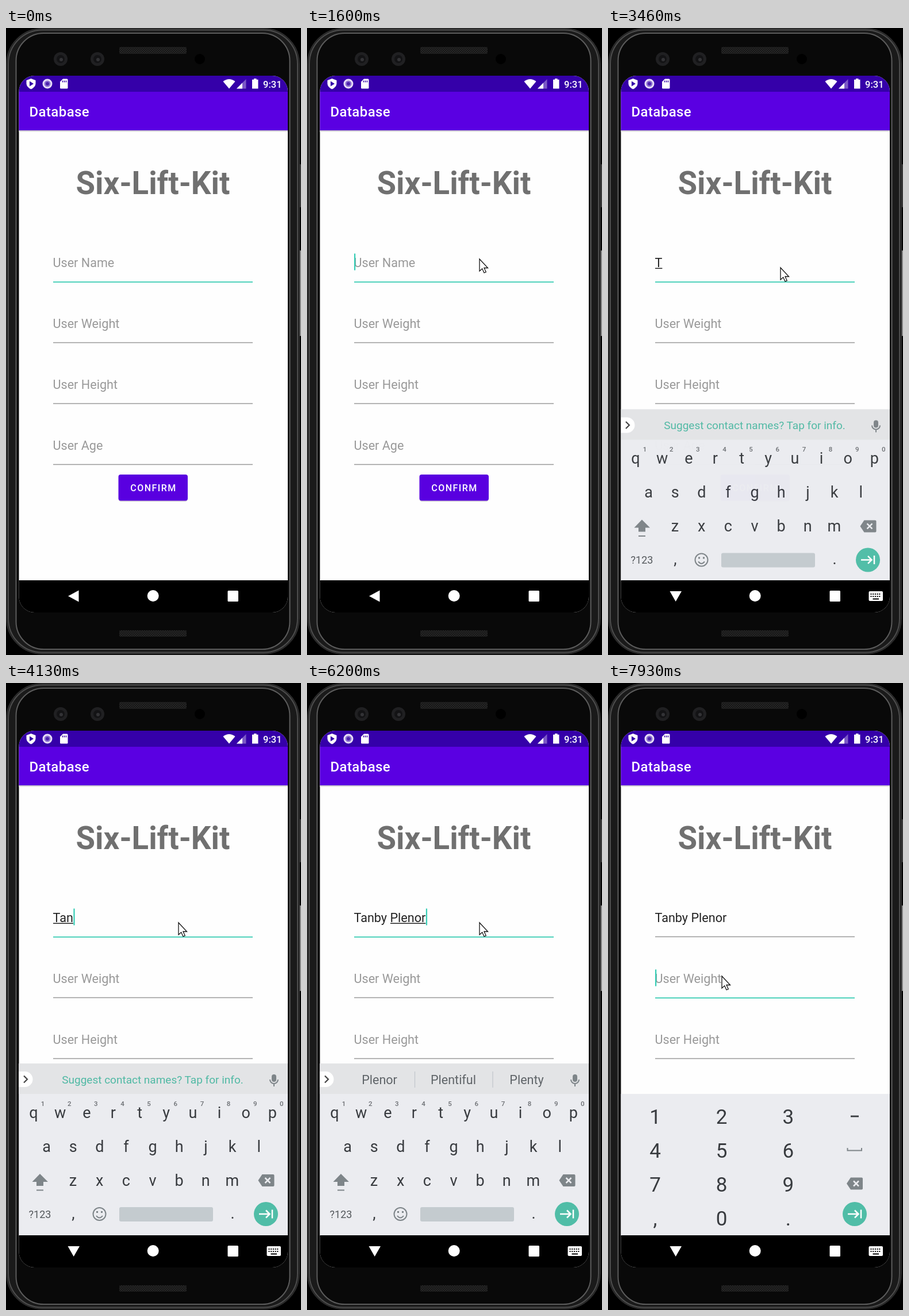
Animation of 513x1091 px, one loop 8 s. Source, as an HTML page:

```html
<!DOCTYPE html>
<html lang="en">
<head>
<meta charset="utf-8">
<title>Database</title>
<style>
  html, body { margin: 0; width: 100%; height: 100%; overflow: hidden; background: #000; }
  svg { display: block; width: 513px; height: 1091px; font-family: Roboto, sans-serif; }
  text { white-space: pre; }
  .mid { text-anchor: middle; }
  .field { font-size: 21.6px; fill: #999; }
  .key { font-size: 27px; fill: #383b3f; text-anchor: middle; }
  .alt { font-size: 11.5px; font-weight: 500; fill: #6b6e72; text-anchor: middle; }
  .num { font-size: 35px; fill: #383b3f; text-anchor: middle; }
  .word { font-size: 21.5px; fill: #5f6468; text-anchor: middle; }
</style>
</head>
<body>
<svg viewBox="0 0 513 1091">
  <defs>
    <pattern id="mesh" width="4" height="4" patternUnits="userSpaceOnUse">
      <rect width="4" height="4" fill="#161616"/>
      <path d="M0 0h2v2h-2zM2 2h2v2h-2z" fill="#262626"/>
    </pattern>
    <linearGradient id="shade" x2="0" y2="1">
      <stop stop-color="#b4b0bc"/><stop offset="1" stop-color="#fefefe"/>
    </linearGradient>
    <clipPath id="screen"><rect x="22.5" y="83" width="467.5" height="934" rx="27"/></clipPath>
    <g id="camera">
      <circle r="12" fill="#202022"/><circle r="7" fill="#131315"/>
      <circle cx="1" cy="1" r="3" fill="#333336"/>
    </g>
    <g id="erase">
      <path d="M-14 0L-7 -10.5H12Q14 -10.5 14 -8.500V8.500Q14 10.500 12 10.500H-7Z" fill="#7e8589"/>
      <path d="M-4 -4.500L5 4.500M5 -4.500L-4 4.500" transform="translate(2)" stroke="#ebecf0" stroke-width="2.500"/>
    </g>
    <g id="next">
      <circle r="21" fill="#50bda7"/>
      <path d="M-12 0H6M0 -6.500L6.500 0L0 6.500M11 -7.500V7.500" fill="none" stroke="#fff" stroke-width="2.500"/>
    </g>
  </defs>

  <!-- Phone body -->
  <rect x="509" y="237" width="4" height="75" rx="1" fill="#3a3a3a"/>
  <rect x="509" y="387" width="4" height="149" rx="1" fill="#8a8a8a"/>
  <rect x="1" y="1" width="509" height="1088" rx="62" fill="#1c1c1c" stroke="#2c2c2c" stroke-width="2"/>
  <rect x="4" y="3.500" width="503" height="1083" rx="59" fill="#1a1a1a" stroke="#4e4e4e" stroke-width="2"/>
  <rect x="17.500" y="9" width="476" height="1072" rx="48" fill="#090909" stroke="#5c5c5c" stroke-width="2"/>
  <rect x="197" y="33" width="117" height="12" rx="2" fill="url(#mesh)"/>
  <rect x="197" y="1048" width="117" height="11" rx="2" fill="url(#mesh)"/>
  <use href="#camera" x="95" y="54"/>
  <use href="#camera" x="159" y="54"/>
  <circle cx="337" cy="54" r="9"/>

  <g clip-path="url(#screen)">
    <rect x="22" y="83" width="469" height="934" fill="#fefefe"/>
    <rect x="22" y="83" width="469" height="28" fill="#3500a9"/>
    <rect x="22" y="111" width="469" height="67" fill="#5a00e2"/>
    <rect x="22" y="178" width="469" height="3" fill="url(#shade)"/>

    <!-- Status bar -->
    <g fill="#fff">
      <path d="M43.500 88L51.500 91V97Q51 103 43.500 106.500Q36 103 35.500 97V91Z"/>
      <path d="M41 92.500V101.500L48 97Z" fill="#3500a9"/>
      <circle cx="72" cy="97" r="7" fill="#8d70d0" stroke="#e6ddf6" stroke-width="3"/>
      <circle cx="72" cy="97" r="3" fill="#4b20ad"/>
      <path d="M99 88.500H106Q107.500 88.500 107.500 90V104Q107.500 105.500 106 105.500H95.500Q94 105.500 94 104V93.500Z"/>
      <path d="M98.500 91.500V94.500M101.500 91.500V94.500M104.500 91.500V94.500" stroke="#3500a9" stroke-width="1.500"/>
      <path d="M377.500 93Q388 85 398.500 93L388 105.500Z"/>
      <path d="M401 105.500L417.500 89V105.500Z" opacity=".35"/>
      <path d="M401 105.500L411 95.500V105.500Z"/>
      <path d="M431 88H435.500V89.800H438.500V105.500H428V89.800H431Z"/>
      <text x="447" y="103.500" font-size="16.500" font-weight="500">9:31</text>
      <text x="40.500" y="154" font-size="24" font-weight="500" letter-spacing=".4">Database</text>
    </g>

    <!-- Form -->
    <text class="mid" x="255.500" y="288.500" font-size="54.600" font-weight="700" fill="#707070">Six-Lift-Kit</text>
    <text class="field" id="name" x="81.500" y="416"></text>
    <text class="field" x="81.500" y="522">User Weight</text>
    <text class="field" x="81.500" y="628">User Height</text>
    <text class="field" x="81.500" y="734">User Age</text>
    <path d="M82 653.500H429M82 759.500H429" stroke="#999" stroke-width="1.600"/>
    <path id="line0" d="M82 442H429"/>
    <path id="line1" d="M82 548H429"/>
    <path id="composing" stroke="#222" stroke-width="1.400"/>
    <rect id="caret" width="2.200" height="29" fill="#35cdb5"/>
    <rect x="196" y="779" width="119.500" height="45" rx="4" fill="#000" opacity=".18"/>
    <rect x="195.500" y="777" width="120.500" height="45.500" rx="4" fill="#5900e0"/>
    <text class="mid" x="256.500" y="805.500" font-size="16" font-weight="500" letter-spacing="1.450" fill="#fff">CONFIRM</text>

    <!-- Letter keyboard -->
    <g id="letters">
      <rect x="22" y="662" width="469" height="300" fill="#ebecf0"/>
      <rect x="22" y="662" width="469" height="53" fill="#e3e4e6"/>
      <path d="M22 676H33A13.500 13.500 0 0 1 33 703H22Z" fill="#fff"/>
      <path d="M31 683.500L37 689.500L31 695.500" fill="none" stroke="#444" stroke-width="2.200"/>
      <text class="mid" id="tip" x="255" y="697" font-size="19" fill="#50b9a4">Suggest contact names? Tap for info.</text>
      <g id="suggestions">
        <path d="M187.500 676V704M323 676V704" stroke="#c3c8cc" stroke-width="1.300"/>
        <text class="word" x="126" y="698"></text>
        <text class="word" x="254.500" y="698"></text>
        <text class="word" x="382" y="698"></text>
      </g>
      <g fill="none" stroke="#7e8589" stroke-width="2">
        <rect x="463" y="682" width="6" height="11" rx="3" fill="#7e8589"/>
        <path d="M459 690A7 7 0 0 0 473 690M466 697V702"/>
        <circle cx="162.500" cy="924" r="11"/>
        <path d="M157 927Q162.500 934 168 927"/>
        <path d="M158.500 919V922M166.500 919V922" stroke-width="3"/>
        <path d="M53 882.500H65"/>
      </g>
      <path d="M59 854L73 868H65V875H53V868H45.500Z" fill="#7e8589"/>
      <use href="#erase" x="452.500" y="865.500"/>
      <text class="mid" x="59" y="931" font-size="18" fill="#54585c">?123</text>
      <rect x="197" y="912" width="163" height="25" rx="3" fill="#c4cbcf"/>
      <use href="#next" x="452" y="924"/>
    </g>

    <!-- Number keyboard -->
    <g id="numbers">
      <rect x="22" y="715" width="469" height="247" fill="#ebecf0"/>
      <path d="M422 754H436" stroke="#383b3f" stroke-width="2.800"/>
      <path d="M416.500 809V813.500H441V809" fill="none" stroke="#7e8589" stroke-width="2"/>
      <use href="#erase" x="429" y="871"/>
      <use href="#next" x="429" y="924"/>
    </g>

    <!-- Navigation bar -->
    <rect x="22" y="961" width="469" height="57"/>
    <g fill="#fff">
      <path id="back"/>
      <circle cx="255.700" cy="988" r="10"/>
      <rect x="385.500" y="979" width="18.500" height="19" rx="1.500"/>
      <g id="switcher">
        <rect x="453.500" y="980" width="24.500" height="17" rx="2"/>
        <path d="M456.500 985H475M456.500 989H475" stroke="#000" stroke-width="2" stroke-dasharray="2 1.700"/>
        <path d="M460.500 993.500H471" stroke="#000" stroke-width="2"/>
      </g>
    </g>
  </g>
  <path id="pointer" d="M0 0V21L4.700 16.800L8 24L11.300 22.600L8 15.500H14.500Z" fill="#fff" stroke="#111" stroke-width="1.300"/>
</svg>
<script>
const $ = id => document.getElementById(id);
const LOOP = 8000, FULL_NAME = 'Tanby Plenor', WORD_START = 6;
const keyTimes = [2930, 3720, 3930, 4140, 4420, 4600, 4830, 4980, 5280, 5480, 5700, 5950];
const NAV = 3250, KEYBOARD = 3340, PREDICT = 4700, MATCH = 6180, NEXT_FIELD = 7500;
const words = [...document.querySelectorAll('.word')];

const label = (cls, x, y, s) => `<text class="${cls}" x="${x}" y="${y}">${s}</text>`;
const row = (chars, x, y, cls = 'key', step = 46.15) =>
  [...chars].map((c, i) => label(cls, x + i * step, y, c)).join('');

$('letters').insertAdjacentHTML('beforeend',
  row('qwertyuiop', 48, 756.5) + row('1234567890', 64, 736, 'alt') +
  row('asdfghjkl', 70.5, 816) + row('zxcvbnm', 116.5, 875) +
  label('key', 117, 932, ',') + label('key', 394, 932, '.'));
$('numbers').insertAdjacentHTML('beforeend',
  ['123', '456', '789', ',0.'].map((s, i) => row(s, 82, 766.5 + i * 59.3, 'num', 115.7)).join(''));

const show = (id, on) => $(id).setAttribute('display', on ? 'inline' : 'none');
const set = (id, attrs) => { for (const k in attrs) $(id).setAttribute(k, attrs[k]); };
const clamp = v => Math.min(1, Math.max(0, v));
const smooth = (t, from, to) => { const p = clamp((t - from) / (to - from)); return p * p * (3 - 2 * p); };

function textWidth(s) {
  $('name').textContent = s;
  return s ? $('name').getComputedTextLength() : 0;
}

function drawName(t) {
  const count = keyTimes.filter(k => k <= t).length;
  const typed = FULL_NAME.slice(0, count);
  const onWeight = t >= NEXT_FIELD;
  const start = count > WORD_START ? textWidth(FULL_NAME.slice(0, WORD_START)) : 0;
  const end = textWidth(typed);
  $('name').textContent = typed || 'User Name';
  $('name').style.fill = count ? '#222' : '#999';
  set('composing', { d: `M${82 + start} 418.3H${81.5 + end}` });
  show('composing', count && count !== WORD_START && !onWeight);

  const blinkStart = onWeight ? NEXT_FIELD : count ? keyTimes[count - 1] : -550;
  set('caret', { x: onWeight ? 82 : 82 + end, y: onWeight ? 498.5 : 392.5 });
  show('caret', (t - blinkStart) % 1000 < 500);
  [0, 1].forEach(i => {
    const active = onWeight === (i === 1);
    set('line' + i, {
      stroke: active ? '#50d2bc' : '#999',
      'stroke-width': active ? 2.2 : 1.6,
      transform: `translate(0 ${active ? 0 : -0.5})`
    });
  });
}

function drawKeyboard(t) {
  const left = 1 - clamp((t - KEYBOARD) / 160);
  show('letters', t > KEYBOARD && t < NEXT_FIELD);
  show('numbers', t >= NEXT_FIELD);
  set('letters', { opacity: 1 - left ** 3, transform: `translate(0 ${25 * left ** 2})` });
  show('tip', t < PREDICT);
  show('suggestions', t >= PREDICT);
  const list = t < MATCH ? ['is', 'and', 'I'] : ['Plenor', 'Plentiful', 'Plenty'];
  words.forEach((w, i) => w.textContent = list[i]);
  set('back', { d: t < NAV ? 'M108 988.5L126.500 978.500V998.500Z' : 'M107.500 980H128L117.700 998Z' });
  show('switcher', t >= NAV);
}

function drawPointer(t) {
  const enter = smooth(t, 600, 1000), travel = smooth(t, 6400, 6850);
  const x = 300 + 170 * (1 - enter) - 102 * travel;
  const y = 402 + 20 * (1 - enter) + 15 * smooth(t, 2050, 2250) + 98 * travel - 5 * smooth(t, 7200, 7350);
  set('pointer', { transform: `translate(${x} ${y})` });
  show('pointer', t > 600);
}

function frame() {
  const t = performance.now() % LOOP;
  drawName(t);
  drawKeyboard(t);
  drawPointer(t);
  requestAnimationFrame(frame);
}
frame();
</script>
</body>
</html>
```
